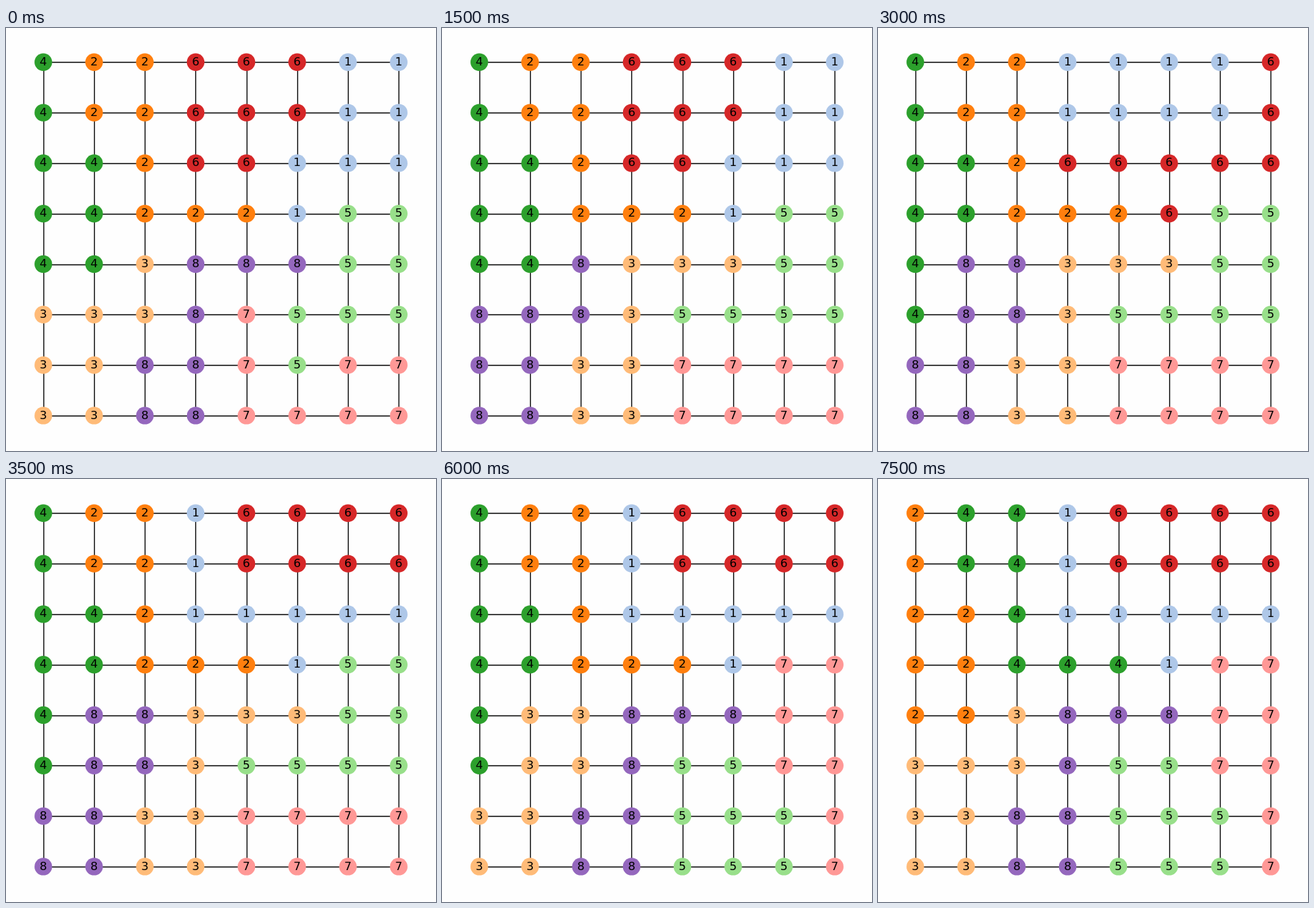
Animation, 620 px wide and 610 px high, one loop 8 s. Source, as an HTML page:

```html
<!DOCTYPE html>
<html lang="en">
<head>
<meta charset="utf-8">
<title>Grid partition</title>
<style>
html, body { margin: 0; width: 620px; height: 610px; overflow: hidden; background: #fefefe; }
svg { display: block; }
path { stroke: #000; stroke-width: 1.39; }
text { font: 16.67px "DejaVu Sans", sans-serif; text-anchor: middle; }
</style>
</head>
<body>
<svg id="stage" width="620" height="610"></svg>
<script>
const SIZE = 8, LOOP = 8000;
const COLORS = ['', '#aec7e8', '#ff7f0e', '#ffbb78', '#2ca02c', '#98df8a', '#d62728', '#ff9896', '#9467bd'];
const START = '42266611' + '42266611' + '44266111' + '44222155' +
              '44388855' + '33387555' + '33887577' + '33887777';

// [time, label, label, cells]: the two labels trade places in the listed
// cells (row and column digits), or everywhere if none are listed.
const STEPS = [
  [1000, 5, 7, '54 65'],
  [1500, 3, 8],
  [2000, 1, 6, '03 04 05 07 13 14 15 17 25 26 27 35'],
  [3000, 4, 8, '41 50'],
  [3500, 1, 6, '04 05 06 14 15 16 23 24 25 26 27 35'],
  [5000, 3, 8],
  [5500, 5, 7, '54 55 67 77'],
  [6000, 5, 7],
  [6500, 2, 4],
  [7500, 2, 3, '41 50']
];

const stage = document.getElementById('stage');
const nodeX = col => 53.8 + col * 73.21;
const nodeY = row => 49.3 + row * 72.8;
const snap = v => Math.round(v) + 0.5;

function add(tag, attrs) {
  const el = document.createElementNS('http://www.w3.org/2000/svg', tag);
  for (const key in attrs) el.setAttribute(key, attrs[key]);
  return stage.appendChild(el);
}

const last = SIZE - 1;
for (let i = 0; i < SIZE; i++) {
  add('path', { d: `M${nodeX(0)} ${snap(nodeY(i))}H${nodeX(last)}` });
  add('path', { d: `M${snap(nodeX(i))} ${nodeY(0)}V${nodeY(last)}` });
}

const nodes = [...START].map((_, i) => {
  const x = nodeX(i % SIZE), y = nodeY(Math.floor(i / SIZE));
  return {
    dot: add('circle', { cx: x, cy: y, r: 12.7 }),
    label: add('text', { x, y: Math.round(y + 4.6) })
  };
});

function labelsAt(time) {
  let labels = [...START].map(Number);
  for (const [at, a, b, cells] of STEPS) {
    if (time < at) break;
    labels = labels.map((label, i) => {
      const id = `${Math.floor(i / SIZE)}${i % SIZE}`;
      if (cells && !cells.split(' ').includes(id)) return label;
      return label === a ? b : label === b ? a : label;
    });
  }
  return labels;
}

function draw() {
  labelsAt(performance.now() % LOOP).forEach((label, i) => {
    nodes[i].dot.setAttribute('fill', COLORS[label]);
    nodes[i].label.textContent = label;
  });
  requestAnimationFrame(draw);
}
draw();
</script>
</body>
</html>
```
